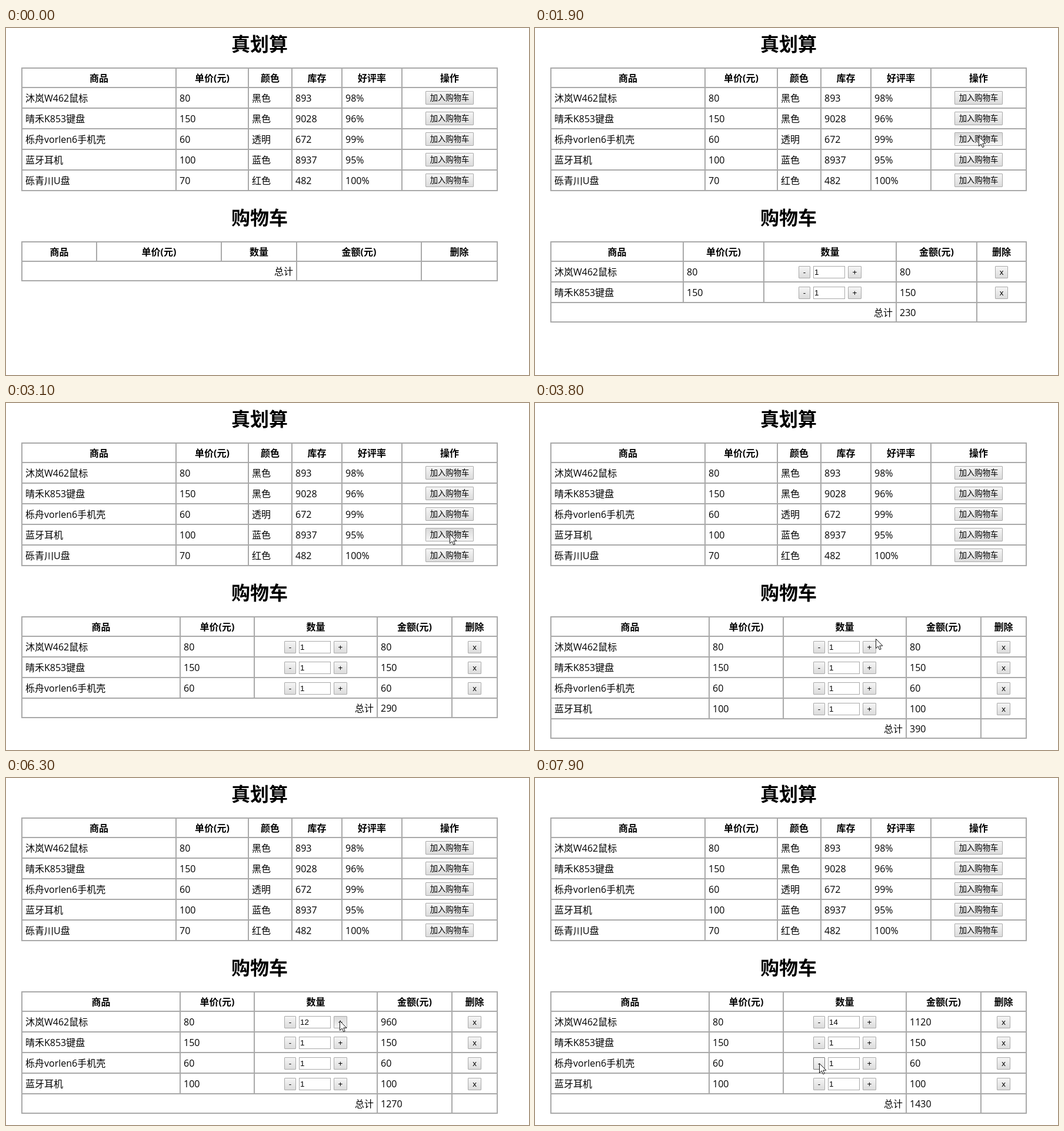
An HTML page that plays this animation: 889x589 px, repeating every 8 s.

```html
<!DOCTYPE html>
<html lang="zh-CN">
<head>
<meta charset="utf-8">
<title>购物车</title>
<style>
  html, body { margin: 0; width: 100%; height: 100%; overflow: hidden; background: #fff; }
  #stage {
    position: relative; width: 889px; height: 589px; overflow: hidden; color: #000;
    font: 16px "Open Sans", "Noto Sans CJK SC", "Noto Sans CJK", sans-serif;
  }
  #stage * { box-sizing: border-box; position: absolute; white-space: pre; }
  h1 { margin: 0; left: 0; width: 862px; height: 40px; font-size: 32px; line-height: 40px; text-align: center; }
  .cell { border: 2px solid #a9a9a9; padding: 0 5px; }
  .head { font-weight: bold; text-align: center; }
  .sum { text-align: right; }
  .btn, .qty { font: 13.33px "Liberation Sans", "Noto Sans CJK SC", "Noto Sans CJK", sans-serif; border: 1px solid #a9a9a9; }
  .btn { background: linear-gradient(#f5f5f5, #dcdcdc); border-radius: 1px; text-align: center; }
  .btn.hover { background: linear-gradient(#f8f8f8, #e0e0e0); border-color: #777; }
  .btn.down { background: linear-gradient(#dadada, #f5f5f5); border-color: #a9a9a9; }
  .qty { background: #fff; padding-left: 1px; text-align: left; }
  #cursor { left: -1px; top: -1px; width: 14px; height: 21px; overflow: visible; }
</style>
</head>
<body>
<div id="stage">
  <h1 style="top:7px">真划算</h1>
  <div id="shop"></div>
  <h1 style="top:302px">购物车</h1>
  <div id="cart"></div>
  <svg id="cursor" viewBox="0 0 14 21">
    <path d="M.5 .5V16.5L4.2 13L6.7 18.7L9.2 17.6L6.8 12.1H11.9Z" fill="#fff" stroke="#111"/>
  </svg>
</div>
<script>
const LOOP = 8000, STEP = 100;
const LEFT = 26, WIDTH = 808, CART_TOP = 362, HEAD = 33, ROW = 35;
const $ = id => document.getElementById(id);

const goods = [
  ['沐岚W462鼠标', 80, '黑色', 893, '98%'],
  ['晴禾K853键盘', 150, '黑色', 9028, '96%'],
  ['栎舟vorlen6手机壳', 60, '透明', 672, '99%'],
  ['蓝牙耳机', 100, '蓝色', 8937, '95%'],
  ['砾青川U盘', 70, '红色', 482, '100%'],
];

// Pointer stops: when it sets off and arrives, and any click there.
const stops = [
  { go: 100, at: 500, x: 743, y: 121, press: 500, release: 800 },
  { go: 800, at: 1100, x: 751, y: 153, press: 1200, release: 1300 },
  { go: 1300, at: 1700, x: 755, y: 185, press: 1900, release: 2000 },
  { go: 2000, at: 2700, x: 755, y: 236 },
  { go: 2700, at: 2900, x: 755, y: 223, press: 3100, release: 3200 },
  { go: 3200, at: 4000, x: 568, y: 413 },
  { go: 6500, at: 7400, x: 484, y: 485, press: 7600, release: 7900 },
];
const adds = stops.filter(s => s.release && s.y < CART_TOP);

// Fast clicking on "+", as a running click count.
const plus = { from: 4600, every: 144, max: 13 };
const plusClicks = t => Math.min(plus.max, Math.max(0, (t - plus.from) / plus.every));

const place = (x, y, w, h) => `left:${x}px;top:${y}px;width:${w}px;height:${h}px`;

const box = (cls, x, y, w, h, text, line = h - 2) =>
  `<div class="${cls}" style="${place(x, y, w, h)};line-height:${line}px">${text}</div>`;

const cell = (x0, x1, y, h, text, cls = '') =>
  box('cell ' + cls, x0, y, x1 - x0 + 2, h + 2, text, h - 1);

const row = (cols, y, h, texts, cls) =>
  texts.map((text, i) => cell(cols[i], cols[i + 1], y, h, text, cls)).join('');

// Shares the table width among columns in proportion to their content.
function columns(weights) {
  const total = weights.reduce((a, b) => a + b);
  let sum = 0;
  return [LEFT, ...weights.map(w => LEFT + Math.round((sum += w) / total * WIDTH))];
}

function cartColumns(count) {
  const name = count > 2 ? 148.5 : count ? 114.8 : 42.1;
  return columns([name, 70, count ? 115.4 : 42.3, 70, 42.7]);
}

function drawShop() {
  const cols = columns([262, 123, 74, 85, 102, 162]);
  let html = row(cols, 67, HEAD, ['商品', '单价(元)', '颜色', '库存', '好评率', '操作'], 'head');
  goods.forEach((item, i) => {
    const y = 67 + HEAD + ROW * i;
    html += row(cols, y, ROW, [...item, '']) + box('btn', 713, y + 7, 82, 23, '加入购物车');
  });
  $('shop').innerHTML = html;
}

function drawCart(count, firstQty) {
  const cols = cartColumns(count);
  const mid = i => (cols[i] + cols[i + 1] + 2) / 2;
  let html = row(cols, CART_TOP, HEAD, ['商品', '单价(元)', '数量', '金额(元)', '删除'], 'head');
  let y = CART_TOP + HEAD, total = 0;
  goods.slice(0, count).forEach(([name, price], i) => {
    const qty = i ? 1 : firstQty, left = mid(2) - 53.5;
    total += price * qty;
    html += row(cols, y, ROW, [name, price, '', price * qty, ''])
      + box('btn', left, y + 9, 20, 21, '-')
      + box('qty', left + 25, y + 9, 54, 21, qty)
      + box('btn', left + 84, y + 9, 23, 21, '+')
      + box('btn', mid(4) - 11.35, y + 9, 22.7, 21, 'x');
    y += ROW;
  });
  html += cell(cols[0], cols[3], y, HEAD, '总计', 'sum')
    + cell(cols[3], cols[4], y, HEAD, total || '') + cell(cols[4], cols[5], y, HEAD, '');
  $('cart').innerHTML = html;
}

function pointer(t) {
  let x = 877, y = 60;
  for (const s of stops) {
    const k = Math.min(1, Math.max(0, (t - s.go) / (s.at - s.go)));
    const ease = k * (2 - k);
    x += (s.x - x) * ease;
    y += (s.y - y) * ease;
  }
  return { x: Math.round(x), y: Math.round(y), shown: t >= stops[0].go };
}

function isDown(t) {
  const clicks = plusClicks(t);
  return stops.some(s => t >= s.press && t < s.release)
    || clicks > 0 && clicks < plus.max && clicks % 1 > 0.6;
}

function drawPointer(t) {
  const { x, y, shown } = pointer(t), down = isDown(t);
  $('cursor').style.display = shown ? 'block' : 'none';
  $('cursor').style.transform = `translate(${x}px,${y}px)`;
  for (const btn of document.querySelectorAll('.btn')) {
    const r = btn.getBoundingClientRect();
    const over = shown && x >= r.left && x < r.right && y >= r.top && y < r.bottom;
    btn.classList.toggle('hover', over);
    btn.classList.toggle('down', over && down);
  }
}

let lastStep = -1;
function frame() {
  const t = Math.floor(performance.now() % LOOP / STEP) * STEP;
  if (t !== lastStep) {
    lastStep = t;
    drawCart(adds.filter(s => s.release <= t).length, 1 + Math.floor(plusClicks(t)));
    drawPointer(t);
  }
  requestAnimationFrame(frame);
}

drawShop();
frame();
</script>
</body>
</html>
```
